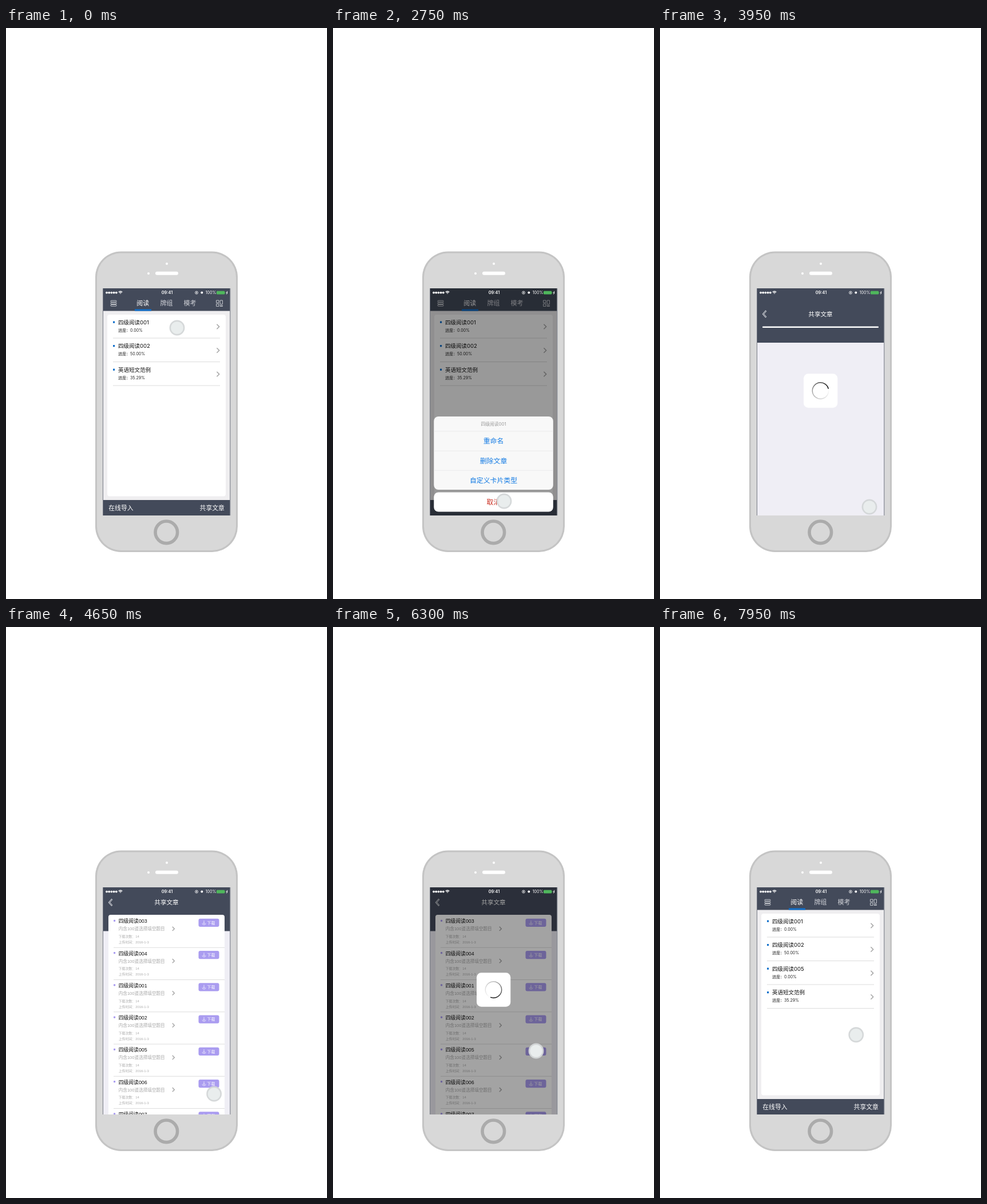
An HTML page with a canvas that plays this animation: 561x998 px, repeating every 8000 ms.

```html
<!DOCTYPE html>
<html lang="zh">
<head>
<meta charset="utf-8">
<style>
html, body { margin: 0; width: 100%; height: 100%; overflow: hidden; background: #fff; }
canvas { display: block; }
</style>
</head>
<body>
<canvas id="stage" width="561" height="998"></canvas>
<script>
const c = document.getElementById('stage').getContext('2d');
const LOOP = 8000, NAVY = '#434a5a', BLUE = '#1170cc', PURPLE = '#aa9cf0';
const SANS = 'Inter, "Noto Sans CJK SC", sans-serif';
const ARIAL = '"Liberation Sans", "Noto Sans CJK SC", sans-serif';

const progress = (t, from, to) => Math.min(1, Math.max(0, (t - from) / (to - from)));
const smooth = p => p * p * (3 - 2 * p);
const easeOut = p => 1 - (1 - p) ** 3;

function box(x, y, w, h, r, fill) {
  c.beginPath();
  c.roundRect(x, y, w, h, r);
  c.fillStyle = fill;
  c.fill();
}

function dot(x, y, r, fill) {
  c.beginPath();
  c.arc(x, y, r, 0, 7);
  c.fillStyle = fill;
  c.fill();
}

function ring(x, y, r, stroke, width, from = 0, to = Math.PI * 2) {
  c.beginPath();
  c.arc(x, y, r, from, to);
  c.strokeStyle = stroke;
  c.lineWidth = width;
  c.stroke();
}

function line(stroke, width, ...points) {
  c.beginPath();
  for (let i = 0; i < points.length; i += 2) c.lineTo(points[i], points[i + 1]);
  c.strokeStyle = stroke;
  c.lineWidth = width;
  c.stroke();
}

// y is the vertical centre of the glyphs
function text(s, x, y, size, fill, align = 'left', font = SANS, weight = 400) {
  c.font = `${weight} ${size}px ${font}`;
  c.textAlign = align;
  c.fillStyle = fill;
  c.fillText(s, x, y + size * 0.37);
}

function shifted(dx, dy, draw) {
  c.save();
  c.translate(dx, dy);
  draw();
  c.restore();
}

function dim(alpha) {
  box(170, 455, 221.5, 397, 0, `rgba(0,0,0,${alpha})`);
}

function drawPhone() {
  box(156, 390.5, 249, 525.5, 45, '#c4c4c4');
  box(159, 393.5, 243, 519.5, 42, '#d8d8d8');
  dot(281, 412, 2, '#fff');
  dot(249, 429, 2, '#fff');
  box(261, 425.8, 40, 6, 3, '#fff');
  ring(280.3, 881.3, 19.3, '#ababab', 5.6);
  box(169, 455, 223.3, 397, 0, '#777b86');
}

function drawStatus() {
  for (let i = 0; i < 5; i++) dot(176 + i * 4.2, 462.6, 1.9, '#fff');
  for (const r of [1, 2.9, 4.8]) ring(200, 465, r, '#fff', 1.2, -Math.PI * 0.75, -Math.PI / 4);
  text('09:41', 281.5, 462.6, 7.3, '#fff', 'center', SANS, 600);
  ring(333, 462.6, 2.5, '#fff', 0.8);
  dot(333, 462.6, 1.1, '#fff');
  dot(342.3, 462.6, 2, '#fff');
  text('100%', 348.7, 462.6, 7, '#fff');
  box(368, 459.8, 14.2, 5.8, 1.4, '#4fb75c');
  box(382.7, 461.6, 1, 2.2, 0.5, '#4fb75c');
  line('#fff', 1, 387, 460, 385.3, 463, 387, 462.6, 385.4, 465.4);
}

function drawHome(articles) {
  box(170, 455, 221.5, 397, 0, '#efeef0');
  box(170, 455, 221.5, 39.5, 0, NAVY);
  c.strokeStyle = '#d5d7dc';
  c.lineWidth = 0.9;
  c.beginPath();
  for (const y of [476.3, 479.9, 483.5]) c.roundRect(183, y, 10, 2.6, 1);
  c.rect(367.6, 476, 4.4, 4.2);
  c.rect(367.6, 482.2, 4.4, 4.2);
  c.rect(374.2, 476, 4.2, 6.8);
  c.rect(374.2, 485, 4.2, 1.4);
  c.stroke();
  text('阅读', 239.2, 481.4, 11, '#fff', 'center', SANS, 500);
  text('牌组', 280.4, 481.4, 11, '#d0d2d8', 'center');
  text('模考', 321.4, 481.4, 11, '#d0d2d8', 'center');
  box(225, 491.5, 29, 3, 0, BLUE);

  box(177, 501, 207, 317.5, 4, '#fff');
  articles.forEach(([name, percent], i) => shifted(0, i * 41.5, () => {
    box(187, 512.5, 3.2, 3.2, 0.5, BLUE);
    text(name, 196, 514, 9.5, '#111');
    text('进度：' + percent, 196, 528.4, 7, '#222');
    line('#a8a8a8', 1.6, 368.4, 517.8, 372.6, 522, 368.4, 526.2);
    box(187, 541.6, 187, 1, 0, '#dcdcdc');
  }));

  box(170, 825, 221.5, 27, 0, NAVY);
  text('在线导入', 179.3, 838.6, 10.8, '#fff');
  text('共享文章', 381.8, 838.6, 10.8, '#fff', 'right');
}

function drawSharedRow(number, pressed) {
  if (pressed) box(188, 504, 185, 56, 0, '#eee');
  box(188, 511.8, 3.2, 3.2, 1, PURPLE);
  text('四级阅读' + number, 196.7, 514.2, 8.8, '#111', 'left', ARIAL);
  text('内含100道选择填空题目', 196.7, 527.5, 7.6, '#a8a8a8', 'left', ARIAL);
  text('下载次数：14', 196.7, 541, 5.9, '#aaa', 'left', ARIAL);
  text('上传时间：2016-1-3', 196.7, 551, 5.9, '#aaa', 'left', ARIAL);
  line('#a8a8a8', 1.5, 290.8, 523.8, 294.3, 527.4, 290.8, 531);
  box(336.5, 509.7, 36, 14.3, 3, PURPLE);
  line('#fff', 0.7, 346, 513, 346, 518.6);
  line('#fff', 0.7, 344.4, 517, 346, 518.6, 347.6, 517);
  ring(346, 517.3, 3.2, '#fff', 0.7, 0.2, Math.PI - 0.2);
  text('下载', 351.5, 517, 6.9, '#fff');
  box(188, 559.8, 194, 1, 0, '#ddd');
}

function drawShared(loaded, pressed) {
  box(170, 455, 221.5, 397, 0, '#efeef5');
  shifted(0, loaded ? 0 : 18.5, () => {
    box(170, 436, 221.5, 95.5, 0, NAVY);
    line('#d5d7dc', 2.6, 185.4, 475.6, 180.4, 481.4, 185.4, 487.2);
    line(NAVY, 1, 185, 476.2, 180.6, 481.4, 185, 486.6);
    text('共享文章', 280.5, 481.2, 10.6, '#fff', 'center', SANS, 500);
    box(179, 503, 203, loaded ? 360 : 2.6, loaded ? 4 : 1, '#fff');
    if (loaded) ['003', '004', '001', '002', '005', '006', '007'].forEach((n, i) =>
      shifted(0, i * 56.25, () => drawSharedRow(n, pressed && n === '005')));
  });
}

function drawSheet(open) {
  dim(0.4 * open);
  shifted(0, (1 - open) * 176, () => {
    box(176.3, 679, 208.5, 128, 8, '#f8f8f8');
    text('四级阅读001', 280.5, 692, 7.8, '#999', 'center');
    ['重命名', '删除文章', '自定义卡片类型'].forEach((label, i) => {
      box(176.3, 704.6 + i * 34.1, 208.5, 0.7, 0, '#e6e6e8');
      text(label, 280.5, 722 + i * 34.1, 11.9, '#147be4', 'center');
    });
    box(176.3, 811.5, 208.5, 34, 8, '#fff');
    text('取消', 280.5, 828.6, 11.9, '#c92a1c', 'center', SANS, 500);
  });
}

function drawSpinner(t) {
  box(251, 604.3, 59.3, 59.4, 8, '#fff');
  const head = -0.25 + (t - 3950) / 1000 * Math.PI * 2;
  const fade = c.createConicGradient(head, 280.5, 634);
  fade.addColorStop(0, '#fff');
  fade.addColorStop(0.45, '#bbb');
  fade.addColorStop(1, '#000');
  ring(280.5, 634, 14.2, fade, 1.5, head + 0.15, head + Math.PI * 2);
}

function drawSuccess(alpha) {
  c.globalAlpha = alpha;
  box(245, 605, 71, 58, 8, 'rgba(255,255,255,.95)');
  line('#333', 1.2, 272.6, 626.2, 277.8, 631.2, 288, 619);
  text('下载成功!', 280.5, 650.2, 8.7, '#222', 'center');
  c.globalAlpha = 1;
}

// [start, end, x, y] of each move of the finger
const MOVES = [
  [0, 1, 299, 524], [2350, 2700, 299, 827], [3150, 3450, 366, 837],
  [4500, 5000, 355, 741], [7815, 8265, 299, 612]
];

function drawTouch(t) {
  let [, , x, y] = MOVES[0];
  for (const [from, to, nextX, nextY] of MOVES) {
    const p = smooth(progress(t, from, to));
    x += (nextX - x) * p;
    y += (nextY - y) * p;
  }
  dot(x, y, 13.4, 'rgba(212,215,216,.96)');
  dot(x, y, 10.8, '#e9eded');
}

const FIRST = [['四级阅读001', '0.00%'], ['四级阅读002', '50.00%']];
const LAST = [['英语短文范例', '35.29%']];
const ADDED = [['四级阅读005', '0.00%']];

function draw(t) {
  c.fillStyle = '#fff';
  c.fillRect(0, 0, 561, 998);
  drawPhone();

  c.save();
  c.beginPath();
  c.rect(170, 455, 221.5, 397);
  c.clip();
  const push = easeOut(progress(t, 3500, 3850)) - easeOut(progress(t, 7550, 7850));
  if (push < 1) shifted(-66 * push, 0, () =>
    drawHome([...FIRST, ...(t > 5000 ? ADDED : []), ...LAST]));
  const sheet = easeOut(progress(t, 1900, 2250)) - easeOut(progress(t, 2850, 3150));
  if (sheet > 0) drawSheet(sheet);
  if (push > 0) shifted((1 - push) * 221.5, 0, () =>
    drawShared(t >= 4300, t >= 5800 && t < 6000));
  if (t >= 3800 && t < 4300) drawSpinner(t);
  const hud = progress(t, 5850, 6050) - progress(t, 7450, 7600);
  if (hud > 0) {
    dim(0.36 * hud);
    if (t < 6800) drawSpinner(t);
    else drawSuccess(hud);
  }
  drawStatus();
  drawTouch(t);
  c.restore();
}

function tick() {
  draw(performance.now() % LOOP);
  requestAnimationFrame(tick);
}
tick();
</script>
</body>
</html>
```
